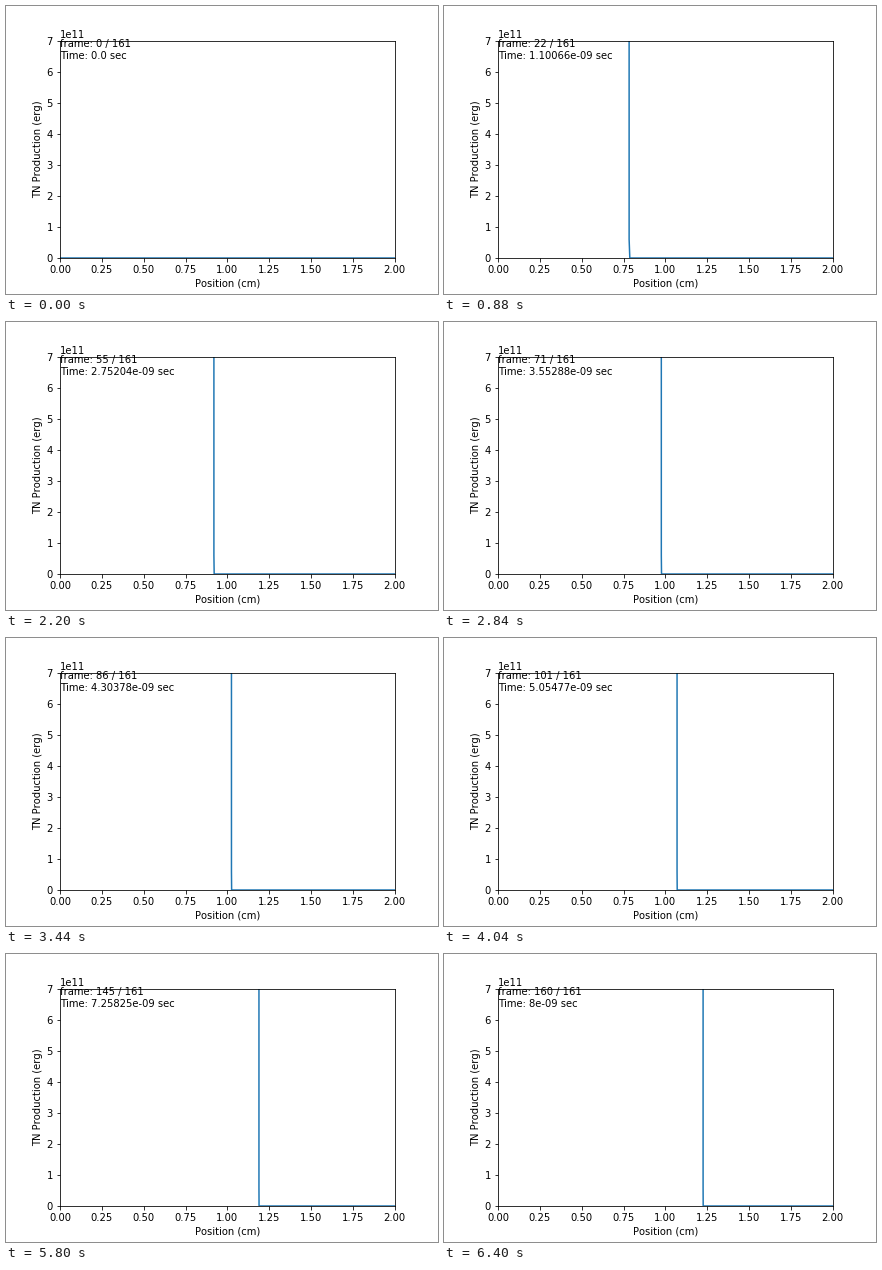
These frames come from a looping animation (432x288 px, 6440 ms). A matplotlib script:

```python
import matplotlib.pyplot as plt
from matplotlib.animation import FuncAnimation

FRAMES = 161
LOOP_MS = 6440
END_NS = 8
PEAK = 5e12  # far above the visible range

plt.rcParams.update({"font.family": "DejaVu Sans", "font.size": 10,
                     "text.kerning_factor": 6})

fig, ax = plt.subplots(figsize=(6, 4), dpi=72)
fig.subplots_adjust(left=0.125, right=0.9, bottom=0.125, top=0.88)
ax.set(xlim=(0, 2), ylim=(0, 7e11),
       xlabel="Position (cm)", ylabel="TN Production (erg)")
line, = ax.plot([], [], color="#1f77b4", lw=1.5)
counter = ax.text(0, 6.8e11, "")
timer = ax.text(0, 6.4e11, "")


def profile(step):
    """Production stays off the scale behind a blast-wave front."""
    if step == 0:
        return [0, 2], [0, 0]
    front = 0.668 * (1 + step / 45) ** 0.4
    foot = front + 0.09 / step
    return [0, front, front, foot, 2], [PEAK, PEAK, 6e10, 0, 0]


def clock(step):
    """Each output lands slightly after its nominal 0.05 ns mark."""
    if step == 0:
        return "0.0"
    drift = step * (2.5e-5 + 2.2e-7 * step)
    return f"{min(0.05 * step + drift, END_NS) * 1e-9:.6g}"


def update(step):
    line.set_data(*profile(step))
    counter.set_text(f"frame: {step} / {FRAMES}")
    timer.set_text(f"Time: {clock(step)} sec")
    return line, counter, timer


anim = FuncAnimation(fig, update, frames=FRAMES, init_func=lambda: update(0),
                     interval=LOOP_MS / FRAMES, repeat=True, repeat_delay=0)
plt.show()
```
